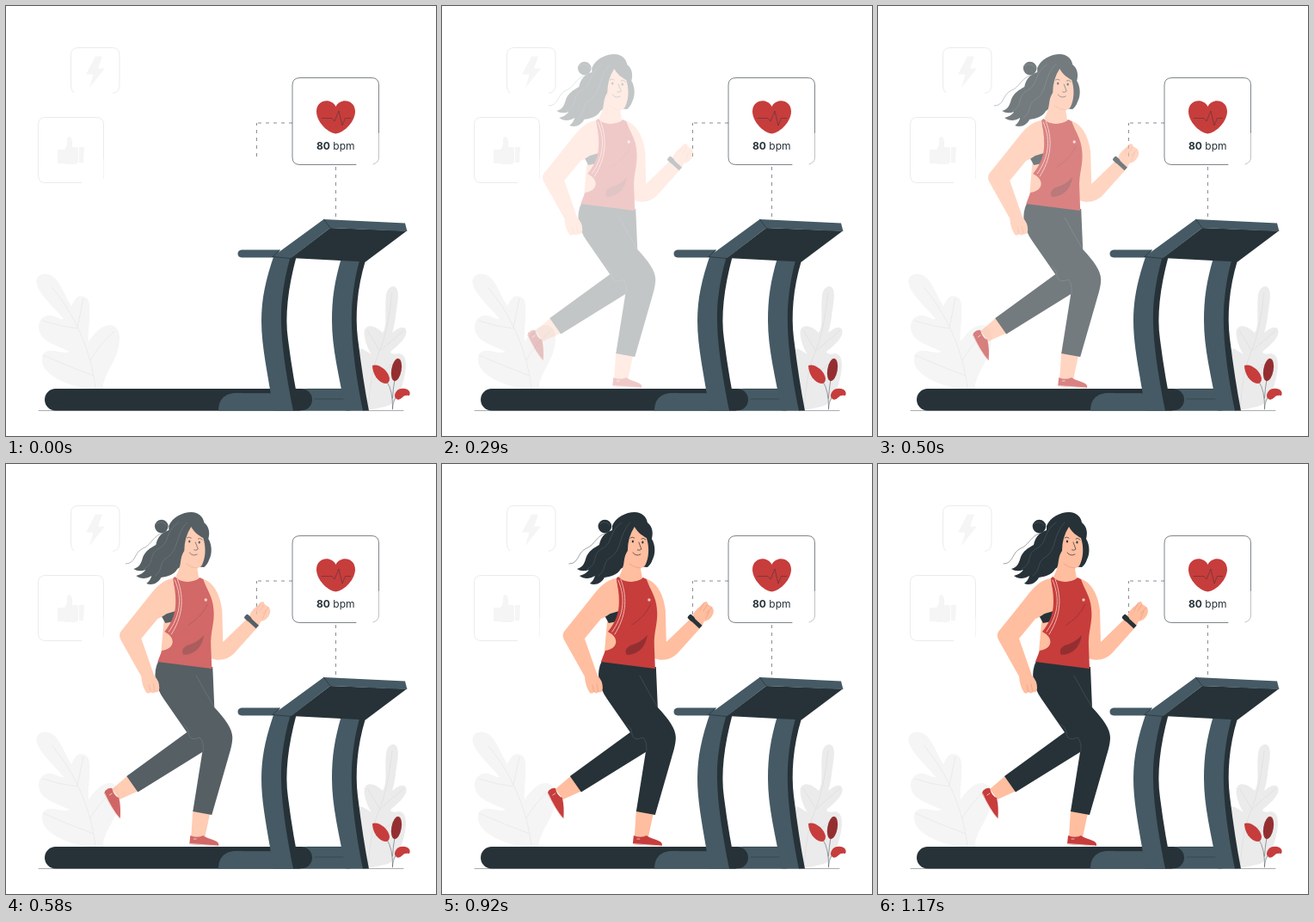
Animation, 500 px wide and 500 px high, one loop 1210 ms. Source, as an HTML page:

```html
<!DOCTYPE html>
<html lang="en">
<head>
<meta charset="utf-8">
<title>Treadmill run</title>
<style>
  html, body { margin: 0; width: 100%; height: 100%; overflow: hidden; background: #fff; }
  svg { display: block; width: 100vw; height: 100vh; }
  .dark { fill: #263238; }
  .slate { fill: #455a64; }
  .red { fill: #c63d3c; }
  .wine { fill: #942f31; }
  .skin { fill: #ffbe9f; }
  .pale { fill: #f5f5f5; }
  .line { fill: none; stroke: #263238; stroke-width: .7; stroke-linecap: round; stroke-linejoin: round; }
  .thin { stroke-width: .45; }
  .dash { stroke-width: .55; stroke-linecap: butt; stroke-dasharray: 4 5; }
  .vein { fill: none; stroke: #e9e9e9; stroke-width: .9; }
  .seam { stroke: #56686f; }
  .crease { stroke: #d98b72; }
  .trim { stroke: #f3c5bd; stroke-width: .9; }
  text { font: 12px Inter, sans-serif; }
</style>
</head>
<body>
<svg viewBox="0 0 500 500">
  <!-- Faded cards -->
  <path class="vein" d="M79 101Q75.500 98 75.500 93V57Q75.500 48.500 84 48.500H123.500Q132 48.500 132 57V92Q132 100 124 101.500"/>
  <path class="pale" d="M104 58.500L93 79.500H101.500L97 95L115 72.500H107L112 58.500Z"/>
  <path class="vein" d="M88 205.500H46Q37.500 205.500 37.500 197V138Q37.500 129.500 46 129.500H105Q113.500 129.500 113.500 138V178"/>
  <path class="vein" style="stroke-width:.5" d="M113.500 178V201"/>
  <path class="pale" d="M60 167H68Q72 162 71 155Q71 152 74 152Q78 154 77 164H82Q84 164 84 167V181Q83 184 79 184H70L67 183H60ZM85 164H91L90 182H85Z"/>

  <!-- Plants -->
  <path class="pale" d="M104 446C85 445 60 437 48 425C39 415 40 402 50 401C58 400 66 405 74 402C60 395 43 391 39 379C35 366 44 358 54 360C60 362 64 365 67 364C58 352 38 336 35.500 322C34 311 47 309 54 314C64 321 68 337 76 349C80 340 84 335 91 338C99 341 97 352 97 362C97 372 95 382 96 390C101 383 111 370 122 371C133 373 133 386 131 396C128 412 117 425 115 434Q112 440 113 446Z"/>
  <path class="vein" d="M53 327C77 354 99 398 104 445M90 340L83 374M43 366Q64 373 83 375M43 406Q72 419 102 430M126 378Q108 394 98 412"/>
  <path fill="#ebebeb" d="M416 470L410 402Q409 397 415 399L425 405C419 396 414 380 418 375C422 369 432 374 438 380C444 372 440 350 442 337C443 328 449 324 453 327C459 332 454 350 453 362Q451 374 449 380C455 375 462 371 465 376C468 384 458 393 447 402Q448 406 457 404C468 405 466 424 461 440C457 455 449 465 440 466C432 468 425 469 416 470Z"/>
  <path class="vein" style="stroke:#e0e0e0" d="M449 333Q444 380 434 402T421 468M463 377L435 401M420 377L434 400M459 409L428 434"/>

  <!-- Heart rate card -->
  <path class="line dash" d="M333 136H292M291.500 175V136M383.500 187V248"/>
  <path class="line" style="stroke-width:.6" d="M407 184.500H342Q333 184.500 333 176V92Q333 83.500 342 83.500H425Q433.500 83.500 433.500 92V147"/>
  <path class="line" style="stroke-width:.3" d="M433.500 147V177Q433 182 427 184"/>
  <path class="red" d="M383.500 148.500C373 147 361 134 361 122.500C361 109 378 106 383.500 117C389 106 406 109 406 122.500C406 134 394 147 383.500 148.500Z"/>
  <path class="line thin" d="M367 130.500H379L382 134L387 122L391 139L394.500 130.500H401"/>
  <text class="dark" x="361" y="166.500"><tspan font-weight="700">80</tspan> bpm</text>

  <!-- Treadmill -->
  <path class="line" style="stroke-width:.4" d="M38 470.500H462"/>
  <rect class="slate" x="335" y="445" width="76" height="25.500" rx="12.700"/>
  <path class="line thin" d="M350 445.300H398.500A12.500 12.500 0 0 1 398.500 470M359 457H404"/>
  <path class="slate" d="M390 293C382 320 379 340 379 366C379 397 387 430 395 470.500H416L404 365Q405 330 412 296Z"/>
  <path class="dark" d="M411 296H418C408 329 406 360 409 386Q415 435 422 470.500H415C406 426 399 376 403 340Q405 318 411 296Z"/>
  <rect class="dark" x="45" y="445" width="311" height="25.500" rx="12.700"/>
  <path class="slate" d="M247 470.500C247 456 256 450 268 450H318L335 470.500Z"/>
  <path class="line thin" d="M276 450H311"/>
  <path class="slate" d="M312 289C302 318 297 340 297 366C297 397 305 430 311 470.500H335L321 365L333 291Z"/>
  <path class="dark" d="M331 291L337.500 292C328 328 324 360 328 388Q334 435 342 470.500H334C325 425 317 377 321 340Q324 314 331 291Z"/>
  <path class="slate" d="M319 283.500H274Q269.500 284 269.500 288T274 292.500H313Z"/>
  <path class="dark" d="M377 258L466 261.500L418 297.500L331 293Z"/>
  <path class="slate" d="M310 291.500L369.500 248L464 252.500L466.500 262L377 258L331 293.500Z"/>
  <path class="line" d="M369.500 248L377 258M310 291.500L318 284M310 291.500L331 293.500"/>

  <!-- Red plant -->
  <path class="line thin" d="M449.500 469Q450 447 443 437M449.500 456Q450 446 452 434M449.500 468Q450 457 456 452"/>
  <path class="red" d="M426 418C433 415 445 424 446 433Q446 439 441 439C433 438 426 428 426 418ZM452 454C452 446 460 443 467 446Q471 449 469 453Q463 452 461 455Q455 461 452 454Z"/>
  <ellipse class="wine" cx="454" cy="423" rx="5.800" ry="13.300" transform="rotate(10 454 423)"/>

  <!-- Runner -->
  <g id="runner">
    <path class="skin" d="M234 133C249 137 256 153 258 170L259 207L290 177C291 170 298 166 303 161Q307 158 307 163L312 166Q316 171 312 177Q309 182 303 183L300 189L273 219C266 227 255 230 245 226Z"/>
    <path class="line thin crease" d="M303 161L298 170M307 163L302 171M312 167L305 174M309 171L305 180"/>
    <path class="line" style="stroke-width:5;stroke-linecap:butt" d="M285.500 177L299 189.500"/>
    <rect class="dark" x="284" y="176" width="8" height="6" rx="2" transform="rotate(44 288 179)"/>

    <path class="dark" d="M196 72C200 62 212 56 222 56C231 56 236 62 237 68C243 73 244 80 242 87C247 95 246 106 243 111Q241 117 237 120L212 118L206 122C202 129 194 131 187 132C184 138 177 142 170 139Q175 135 176 130C170 134 163 134 158 130Q166 128 169 123Q161 126 155 122C163 120 164 114 166 108C169 101 174 98 181 94C183 85 187 80 196 77Z"/>
    <circle class="dark" cx="187.500" cy="72.500" r="7.800"/>
    <path class="line thin" d="M146 116C158 116 155 103 166 98C177 94 177 81 196 78"/>
    <path class="line thin seam" d="M181 70Q188 64 194 72M207 68C192 78 197 92 185 98C171 105 181 116 167 122M217 68C203 83 208 99 195 108C183 115 191 122 180 130"/>

    <path class="skin" d="M150 361L161 380L139 390L130 378ZM224 402L244 406L238 434L222 433Z"/>
    <path class="red" d="M122 380Q126 376 130 377Q132 386 138 388C140 396 140 404 139.500 412Q136 411 121 383ZM221 432Q229 435 236 432C243 437 253 437 254 442V444L220 442Z"/>
    <path class="line trim" d="M121.500 383Q129 401 139 412M220.500 441.500L253 444"/>
    <path class="line trim" d="M127 385L130 383M225 436H228"/>

    <path class="skin" d="M203 132L230 136L226 210L198 222L187 219L190 185L196 150Z"/>
    <path class="dark" d="M187 176L204 171L202 183L192 185Z"/>
    <path class="dark" d="M184 229L247 236L249 283C262 297 270 308 270 318C270 326 267 335 265 342L246 408L224 404L235 335L160 381.500L147 363L217 312L190 273C180 258 177 243 184 229Z"/>
    <path class="line thin seam" d="M228 246Q238 265 249 283M213 303Q219 307 219 314Q221 323 232 318Q237 323 236 334"/>

    <path class="red" d="M203 131C211 138 224 138 232 132L236 134C240 146 247 154 248 168C250 184 244 195 245 212L246 238L183 230L188 217C203 215 205 202 191 195C200 184 204 174 204 160Q204 145 200 134Z"/>
    <path class="line trim" d="M203 135C213 158 208 178 196 195M206 134C215 158 211 179 199 198"/>
    <path class="wine" d="M237 199Q229 208 217 211Q209 216 213 222Q233 221 237 199Z"/>
    <path class="line" style="stroke:#942f31" d="M241 163Q234 178 219 187"/>
    <circle cx="239" cy="158" r="1.700" fill="#f3c5bd"/>

    <path class="skin" d="M201 133C190 134 181 143 172 155Q157 174 140 195Q137 199 141 206L164 247Q165 259 170 266Q173 268 175 265Q178 268 180 265Q185 267 185 260Q185 252 179 246L164 203L183 180C194 176 203 167 203 153Z"/>
    <path class="line thin crease" d="M175 265L173 257M180 265L178 256"/>

    <path class="skin" d="M222 73C226 80 232 84 236 86C239 95 239 106 236 114Q234 121 229 121L231 133C225 138 209 139 204 131Q209 122 210 112Q211 105 214 101Q214 85 222 73Z"/>
    <path class="line thin crease" d="M216 116Q222 121 229 121"/>
    <path class="line" d="M227 91L230 99Q228 101 225.500 100M220 103Q224 108 229 105"/>
    <path class="line" d="M217 86Q219 84 222 86M230 87Q232 85 235 88"/>
    <ellipse class="dark" cx="220" cy="90" rx="1.100" ry="1.600"/>
    <ellipse class="dark" cx="231.500" cy="91" rx="1.100" ry="1.600"/>
  </g>
</svg>
<script>
  const LOOP = 1210, STEPS = 29, HOLD = 3, SLIDE = 30;
  const runner = document.getElementById('runner');
  const start = performance.now();

  const cubic = (a, b, s) => 3 * (1 - s) ** 2 * s * a + 3 * (1 - s) * s * s * b + s ** 3;

  // Overshooting ease: cubic-bezier(.36, -.01, .5, 1.38)
  function ease(x) {
    let lo = 0, hi = 1;
    for (let i = 0; i < 24; i++) {
      const mid = (lo + hi) / 2;
      if (cubic(.36, .5, mid) < x) lo = mid; else hi = mid;
    }
    return cubic(-.01, 1.38, lo);
  }

  function draw(now) {
    const t = Math.max(0, now - start) % LOOP;
    const step = Math.floor(t * .024 + .1); // 24 pictures a second
    const y = step < HOLD ? 0 : ease(Math.min(1, (step + 1) / STEPS));
    runner.setAttribute('opacity', Math.min(1, y));
    runner.setAttribute('transform', `translate(${SLIDE * (y - 1)} 0)`);
    requestAnimationFrame(draw);
  }
  draw(start);
</script>
</body>
</html>
```
